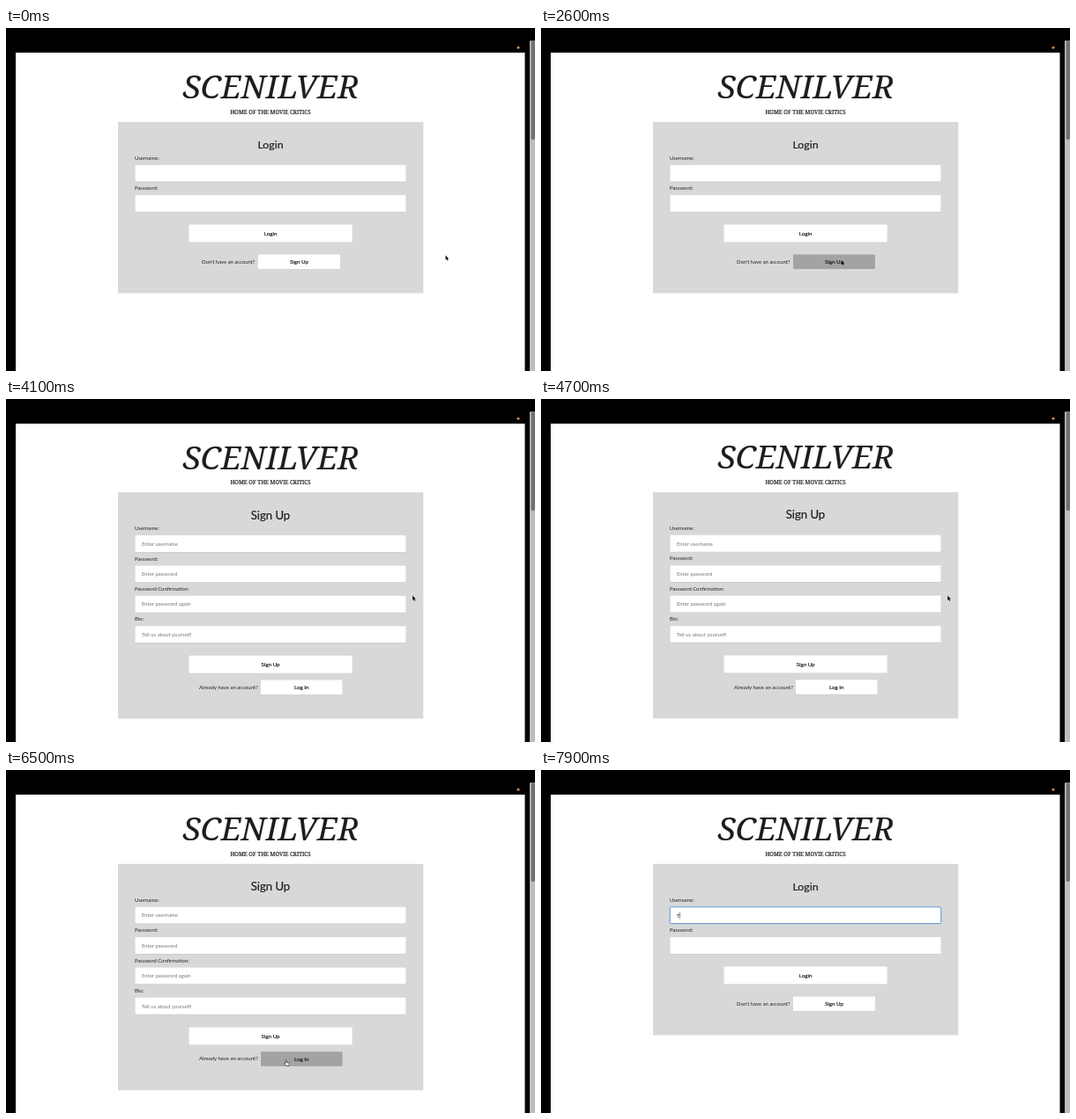
Write an HTML page that moves like this. It is 600 by 390 pixels and loops after 8 s.

```html
<!DOCTYPE html>
<html lang="en">
<head>
<meta charset="utf-8">
<title>Login and sign up</title>
<style>
  html, body { margin: 0; width: 100%; height: 100%; overflow: hidden; background: #000; }
  svg { display: block; width: 600px; height: 390px; }
  text { font-family: Lato, sans-serif; fill: #222; }
  .serif { font-family: "Noto Serif", serif; }
  .mid { text-anchor: middle; }
  .hint { fill: #777; }
  .bold { fill: #1c1c1c; stroke: #1c1c1c; stroke-width: 0.18px; }
</style>
</head>
<body>
<svg id="stage" viewBox="0 0 600 390" xmlns="http://www.w3.org/2000/svg"></svg>
<script>
const NS = "http://www.w3.org/2000/svg";
const LOOP = 8000, STEP = 100;
const ROW = 34.37; // distance between form fields
const stage = document.getElementById("stage");

function add(parent, tag, attrs, content) {
  const el = document.createElementNS(NS, tag);
  for (const k in attrs) el.setAttribute(k, attrs[k]);
  if (content) el.textContent = content;
  parent.appendChild(el);
  return el;
}
const rect = (p, x, y, width, height, fill, more) =>
  add(p, "rect", { x, y, width, height, fill, ...more });
const label = (p, x, y, size, str, cls = "") =>
  add(p, "text", { x, y, "font-size": size, class: cls }, str);
const show = (el, on) => el.setAttribute("display", on ? "inline" : "none");

function panel(height, title, size, fields) {
  const g = add(page, "g", {});
  rect(g, 127, 106.8, 346.3, height, "#d8d8d8");
  label(g, 300, 137.2, size, title, "mid bold");
  fields.forEach(([name, hint], i) => {
    const y = 155.5 + i * ROW;
    label(g, 146, y - 5.6, 5.9, name);
    rect(g, 146, y + 0.3, 308, 19.4, "#c6c8ca", { rx: 1.2 });
    rect(g, 146.4, y + 0.2, 307.2, 18.9, "#fff", { rx: 1 });
    label(g, 154, y + 11.9, 5.95, hint, "hint");
  });
  return g;
}

function button(p, x, y, w, h, str) {
  rect(p, x, y + 0.3, w, h, "#c9c9c9", { rx: 1 });
  const face = rect(p, x, y, w, h, "#fff", { rx: 1 });
  label(p, x + w / 2, y + h / 2 + 2.1, 6.2, str, "mid bold");
  const hit = ([px, py]) => px > x && px < x + w && py > y && py < y + h;
  return { face, hit };
}

// Window frame
rect(stage, 11, 28, 577.5, 362, "#fff");
add(stage, "circle", { cx: 581, cy: 22.2, r: 1.5, fill: "#d08a48" });
rect(stage, 594, 14.5, 6, 376, "#bdbdbd");
rect(stage, 595.6, 15, 4.4, 112, "#707070", { rx: 2 });

// Page
const page = add(stage, "g", {});
const brand = label(page, 300.5, 80.2, 36.8, "SCENILVER", "serif mid bold");
brand.setAttribute("font-style", "italic");
label(page, 300, 98, 6.25, "HOME OF THE MOVIE CRITICS", "serif mid bold");

const login = panel(194.7, "Login", 12.3, [["Username:"], ["Password:"]]);
label(login, 222, 268, 5.92, "Don't have an account?");
const loginButtons = [
  button(login, 207.5, 223.5, 185.2, 20, "Login"),
  button(login, 286, 257.4, 93, 16.5, "Sign Up")
];

const signUp = panel(257.3, "Sign Up", 13.1, [
  ["Username:", "Enter username"],
  ["Password:", "Enter password"],
  ["Password Confirmation:", "Enter password again"],
  ["Bio:", "Tell us about yourself!"]
]);
label(signUp, 219, 330.4, 6, "Already have an account?");
const toLogin = button(signUp, 289, 320.2, 92.5, 16.5, "Log In");
const signUpButtons = [button(signUp, 207.5, 292.4, 185.2, 20, "Sign Up"), toLogin];

// Focus ring, typed letter and caret
const ring = add(login, "g", {});
rect(ring, 145.7, 155.2, 308.6, 19.8, "none", { rx: 1.8, stroke: "#b9d0ee", "stroke-width": 1, opacity: 0.5 });
rect(ring, 146.3, 155.8, 307.4, 18.7, "#fff", { rx: 1.3, stroke: "#4a82cb", "stroke-width": 0.8 });
const typed = label(login, 154, 167.5, 5.95, "T");
const caret = rect(login, 154, 161.7, 0.6, 7.4, "#444");

// Pointers, both with the hot spot at 0,0
const arrow = add(stage, "path", {
  d: "M0 0V5.3L1.2 4.3L2.1 6.2L3 5.8L2.1 4H3.6Z",
  stroke: "#fff", "stroke-width": 0.4, "paint-order": "stroke"
});
const hand = add(stage, "path", {
  d: "M-.8 .4Q0-.4 .5 .4V2.5L3 3.1Q3.7 3.3 3.5 4.2L3 6.3H-.3L-2 3.9Q-1.6 3.1-.8 3.8Z",
  fill: "#fff", stroke: "#111", "stroke-width": 0.65, "stroke-linejoin": "round"
});

const part = (a, b, t) => Math.min(1, Math.max(0, (t - a) / (b - a)));
function smooth(a, b, t) {
  const k = part(a, b, t);
  return k * k * (3 - 2 * k);
}
const settle = (a, b, t) => 1 - 2 ** (-10 * part(a, b, t));

// Pointer glides: start, end, x, y
const glides = [
  [200, 600, 376, 142.5],
  [700, 900, 383.5, 183],
  [1300, 1400, 385, 197],
  [1400, 2400, 341, 273],
  [2400, 2600, 340.8, 264],
  [3300, 3600, 461.2, 223.6],
  [5700, 6500, 317.8, 330],
  [6700, 7100, 302, 165.5]
];
const pointer = t => glides.reduce(([x, y], [a, b, tx, ty]) => {
  const k = smooth(a, b, t);
  return [x + (tx - x) * k, y + (ty - y) * k];
}, [498.6, 258.4]);

// A button greys while the pointer stays on it for 150 ms
function tint({ face, hit }, t) {
  let k = 0;
  for (let ago = 0; ago < 150; ago += 25) k += hit(pointer(t - ago)) / 6;
  const mix = c => Math.round(255 + (c - 255) * k);
  face.setAttribute("fill", `rgb(${mix(161)},${mix(164)},${mix(163)})`);
}

function draw(t) {
  const onSignUp = t >= 3000 && t < 6600;
  show(login, !onSignUp);
  show(signUp, onSignUp);
  (onSignUp ? signUpButtons : loginButtons).forEach(b => tint(b, t));

  const scroll = smooth(5800, 6300, t) - settle(4000, 4500, t);
  page.setAttribute("transform", `translate(0 ${0.85 * scroll})`);

  const at = pointer(t), hasText = t >= 7800;
  const isHand = onSignUp && toLogin.hit(at);
  for (const el of [arrow, hand]) el.setAttribute("transform", `translate(${at})`);
  show(arrow, !isHand && !hasText);
  show(hand, isHand);

  ring.setAttribute("opacity", smooth(7200, 7400, t));
  show(typed, hasText);
  show(caret, t >= 7300);
  caret.setAttribute("x", hasText ? 157.2 : 154);
}

function loop(now) {
  draw(Math.floor((now % LOOP) / STEP) * STEP);
  requestAnimationFrame(loop);
}
draw(0);
requestAnimationFrame(loop);
</script>
</body>
</html>
```
